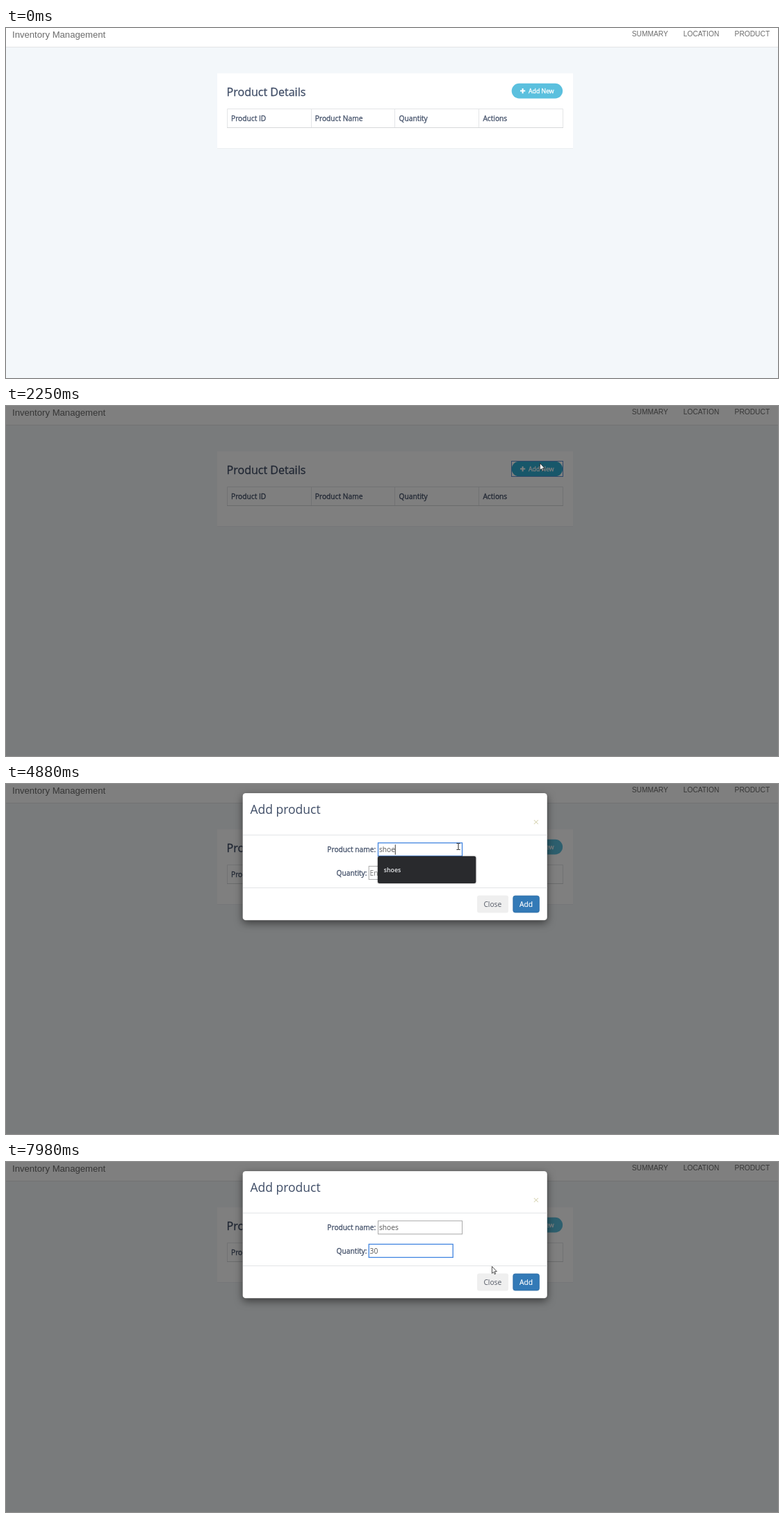
An HTML page for the animation above (8 s loop, 1111 by 504 pixels).

```html
<!DOCTYPE html>
<html lang="en">
<head>
<meta charset="utf-8">
<title>Inventory Management</title>
<style>
  html, body { margin: 0; width: 100%; height: 100%; overflow: hidden; background: #f3f7fa; }
  svg { display: block; width: 1111px; height: 504px; }
  text { font: 10.22px "Open Sans", sans-serif; fill: #404e67; white-space: pre; }
  .nav text { font-family: "Liberation Sans", Arial, sans-serif; fill: #6c6c6c; }
  .nav .brand { font-size: 13.14px; }
  .strong { stroke: #404e67; stroke-width: .3px; }
  .title { font-size: 16.06px; }
  .heading { font-size: 17.52px; }
  .rule { fill: none; stroke: #e3e5e7; }
  .add { font-size: 8.76px; fill: #fff; stroke: #fff; stroke-width: .3px; }
  .sheet { filter: drop-shadow(0 4px 6px rgba(0, 0, 0, .5)); }
  .field { fill: #fff; stroke: #a9a9a9; }
  .field.focus { stroke: #4285e0; stroke-width: 1.3px; }
  .value { fill: #555; }
  .value.hint { fill: #757575; }
  .list { filter: drop-shadow(0 .5px 1px rgba(0, 0, 0, .5)); }
  .list text { font-size: 8.76px; font-weight: 600; fill: #e8eaed; }
</style>
</head>
<body>
<svg viewBox="0 0 1111 504">
  <rect width="1111" height="504" fill="#f3f7fa"/>

  <g class="nav">
    <rect width="1111" height="27" fill="#fff"/>
    <path class="rule" d="M0 27.5H1111"/>
    <text class="brand" x="9" y="13.6">Inventory Management</text>
    <text x="900.8" y="12.4">SUMMARY</text>
    <text x="974.8" y="12.4">LOCATION</text>
    <text x="1048.6" y="12.4">PRODUCT</text>
  </g>

  <rect x="304" y="66" width="512" height="108" fill="#e6eaed"/>
  <rect x="304" y="65.3" width="512" height="107.9" fill="#fff"/>
  <text class="title strong" x="317.6" y="98.4">Product Details</text>
  <path class="rule" d="M318.5 144V116.5H801.5V144M439.5 116V143M559.5 116V143M680.5 116V143"/>
  <path class="rule" d="M318 143.5H802" style="stroke:#d6d8da"/>
  <g class="strong">
    <text x="324" y="133.8">Product ID</text>
    <text x="444.8" y="133.8">Product Name</text>
    <text x="565.6" y="133.8">Quantity</text>
    <text x="686.4" y="133.8">Actions</text>
  </g>

  <rect id="pill" x="727.7" y="79.8" width="73.4" height="21.6" rx="10.8"/>
  <path d="M740 90.6H747.2M743.6 87V94.2" stroke="#fff" stroke-width="2"/>
  <text class="add" x="752" y="94">Add New</text>
  <rect id="ring" x="727.5" y="79.5" width="74" height="22" fill="none" stroke="#5f94d6"/>

  <rect id="shade" width="1111" height="504"/>

  <g id="modal">
    <rect class="sheet" x="340.5" y="0" width="438.4" height="183.3" rx="4.4" fill="#fff" stroke="#000" stroke-opacity=".25" stroke-width=".7"/>
    <text class="heading" x="351.4" y="29.8">Add product</text>
    <text id="cross" x="758.6" y="47.4" style="font-size:15.3px">×</text>
    <path class="rule" d="M341 60.5H778.5M341 136.5H778.5"/>
    <text class="strong" x="462.3" y="85.2">Product name:</text>
    <text class="strong" x="475.6" y="118.7">Quantity:</text>
    <g id="name"></g>
    <g id="quantity"></g>
    <rect x="678" y="147.6" width="45" height="24.8" rx="2.9" fill="#efefef"/>
    <text x="687.4" y="163.5" style="fill:#555a66">Close</text>
    <rect x="729.8" y="148" width="37.6" height="24" rx="2.9" fill="#337ab7" stroke="#2e6da4" stroke-width=".8"/>
    <text x="739" y="163.5" style="fill:#fff;stroke:#fff;stroke-width:.2px">Add</text>
  </g>

  <g id="list" class="list"></g>

  <circle id="click" r="9" fill="#ff0" fill-opacity=".47"/>
  <g id="cursor">
    <path id="arrow" d="M.4 .4V10.4L2.7 8.3 4.2 11.6 5.7 10.9 4.2 7.7H7.3Z" fill="#fff" stroke="#222" stroke-width=".8"/>
    <path id="beam" d="M-2.5-4.5H-.7L0-4 .7-4.5H2.5M0-4V4M-2.5 4.5H-.7L0 4 .7 4.5H2.5" fill="none" stroke="#222"/>
    <path id="hand" d="M-1 .6Q0-.6 1 .6V4.5L4.9 5.3Q6 5.7 5.8 7L5 11.6H-1.2L-4 7.6Q-3.4 6.2-2.2 7L-1 8Z" fill="#fff" stroke="#222" stroke-width=".8"/>
  </g>
</svg>

<script>
const LOOP = 8000, MODAL_TOP = 13, ROW = 26.3;
const $ = id => document.getElementById(id);

function make(parent, tag, attrs) {
  const el = document.createElementNS("http://www.w3.org/2000/svg", tag);
  for (const k in attrs) el.setAttribute(k, attrs[k]);
  return parent.appendChild(el);
}
const show = (el, on) => el.style.display = on ? "" : "none";
const within = (t, a, b) => t >= a && t < b;

// Last entry whose time has come; entries are [time, ...values].
const latest = (track, t) => track.filter(e => e[0] <= t).pop();

const pointer = [
  [0, 0, 0, ""],
  [380, 997, 379, "arrow"], [460, 973, 354, "arrow"], [540, 939, 315, "arrow"],
  [620, 908, 277, "arrow"], [700, 891, 258, "arrow"],
  [930, 882, 238, "arrow"], [1010, 863, 201, "arrow"], [1080, 844, 162, "arrow"],
  [1160, 825, 122, "arrow"], [1240, 808, 86, "arrow"], [1310, 796, 62, "arrow"],
  [1390, 788, 52, "arrow"], [1460, 779, 63, "arrow"], [1540, 772, 75, "arrow"],
  [1610, 768, 82, "hand"], [2080, 768, 82, "arrow"],
  [2560, 752, 84, "arrow"], [2640, 724, 87, "arrow"], [2710, 695, 90, "arrow"],
  [2790, 672, 92, "arrow"], [2860, 657, 93, "arrow"],
  [2940, 654, 92, "beam"], [3010, 652, 91, "beam"], [3090, 651, 90, "beam"],
  [5650, 650, 92, "beam"], [5730, 648, 97, "beam"], [5800, 643, 105, "arrow"],
  [5880, 638, 113, "arrow"], [5960, 634, 123, "beam"], [6030, 630, 130, "beam"],
  [6110, 627, 135, "beam"],
  [7820, 648, 139, "arrow"], [7900, 680, 145, "arrow"], [7980, 699, 150, "arrow"]
];
const shade = [[0, 0], [2080, .06], [2170, .335], [2250, .5]];
const modal = [[0, -33, 0], [2320, -16, .5], [2400, 1, 1], [2490, 11.5, 1], [2560, MODAL_TOP, 1]];
const clicks = [[1840, 1930, 768, 82], [3320, 3550, 650, 89], [6340, 6510, 625, 135]];

const fields = [
  {
    box: $("name"), x: 535.5, y: 71.8, hint: "Enter product name", focus: [3320, 6340],
    typed: [[0, ""], [4020, "s"], [4270, "sh"], [4730, "sho"], [4880, "shoe"], [4960, "shoes"]],
    caretOff: [[3870, 4020], [5500, 6030]],
    options: ["pqr", "soap", "pol", "shoes", "shampoo", "wow", "salt"]
  },
  {
    box: $("quantity"), x: 522.2, y: 105.4, hint: "Enter quantity", focus: [6340, LOOP],
    typed: [[0, ""], [7040, "3"], [7290, "30"]],
    caretOff: [[6890, 7040], [7820, LOOP]],
    options: ["20", "30", "10", "35", "300", "50"]
  }
];

for (const f of fields) {
  f.rect = make(f.box, "rect", { x: f.x, y: f.y, width: 121, height: 19 });
  f.text = make(f.box, "text", { x: f.x + 1.4, y: f.y + 13.3 });
  f.caret = make(f.box, "path", { stroke: "#222", "stroke-width": .9 });
}

const list = $("list");
const panel = make(list, "rect", { width: 141.2, rx: 2.5, fill: "#292a2d" });
const rows = Array.from({ length: 6 }, () => make(list, "text", {}));

function drawField(f, t) {
  const value = latest(f.typed, t)[1];
  const focused = within(t, ...f.focus);
  f.rect.setAttribute("class", focused ? "field focus" : "field");
  f.text.setAttribute("class", value ? "value" : "value hint");
  f.text.textContent = value || f.hint;
  const blink = f.caretOff.some(span => within(t, ...span));
  show(f.caret, focused && !blink);
  if (focused) {
    const x = f.x + 1.7 + (value ? f.text.getComputedTextLength() : 0);
    f.caret.setAttribute("d", `M${x} ${f.y + 2.5}v14.5`);
  }
}

function drawList(t) {
  const f = fields.find(f => within(t, ...f.focus));
  const value = f && latest(f.typed, t)[1];
  const done = f && value === f.typed[f.typed.length - 1][1];
  show(list, f && !done);
  if (!f || done) return;
  const items = f.options.filter(o => o.startsWith(value)).slice(0, 6);
  const top = f.y + MODAL_TOP + 19.3;
  panel.setAttribute("x", f.x - .5);
  panel.setAttribute("y", top);
  panel.setAttribute("height", 12.7 + ROW * items.length);
  rows.forEach((row, i) => {
    row.textContent = items[i] || "";
    row.setAttribute("x", f.x + 8.3);
    row.setAttribute("y", top + 22.7 + ROW * i);
  });
}

function draw(t) {
  const [, x, y, shape] = latest(pointer, t);
  $("cursor").setAttribute("transform", `translate(${x} ${y})`);
  for (const id of ["arrow", "beam", "hand"]) show($(id), id === shape);

  const click = clicks.find(c => within(t, c[0], c[1]));
  show($("click"), click);
  if (click) $("click").setAttribute("transform", `translate(${click[2]} ${click[3]})`);

  $("pill").setAttribute("fill", within(t, 1610, 2560) ? "#31b0d5" : "#5bc0de");
  show($("ring"), within(t, 1840, 2560));
  $("shade").setAttribute("opacity", latest(shade, t)[1]);

  const [, top, alpha] = latest(modal, t);
  $("modal").setAttribute("transform", `translate(0 ${top})`);
  $("modal").setAttribute("opacity", alpha);
  show($("modal"), alpha > 0);
  $("cross").style.fill = t < 2490 ? "#bbb" : "#dad7b8";

  for (const f of fields) drawField(f, t);
  drawList(t);
}

const start = performance.now();
(function tick() {
  draw((performance.now() - start) % LOOP);
  requestAnimationFrame(tick);
})();
</script>
</body>
</html>
```
